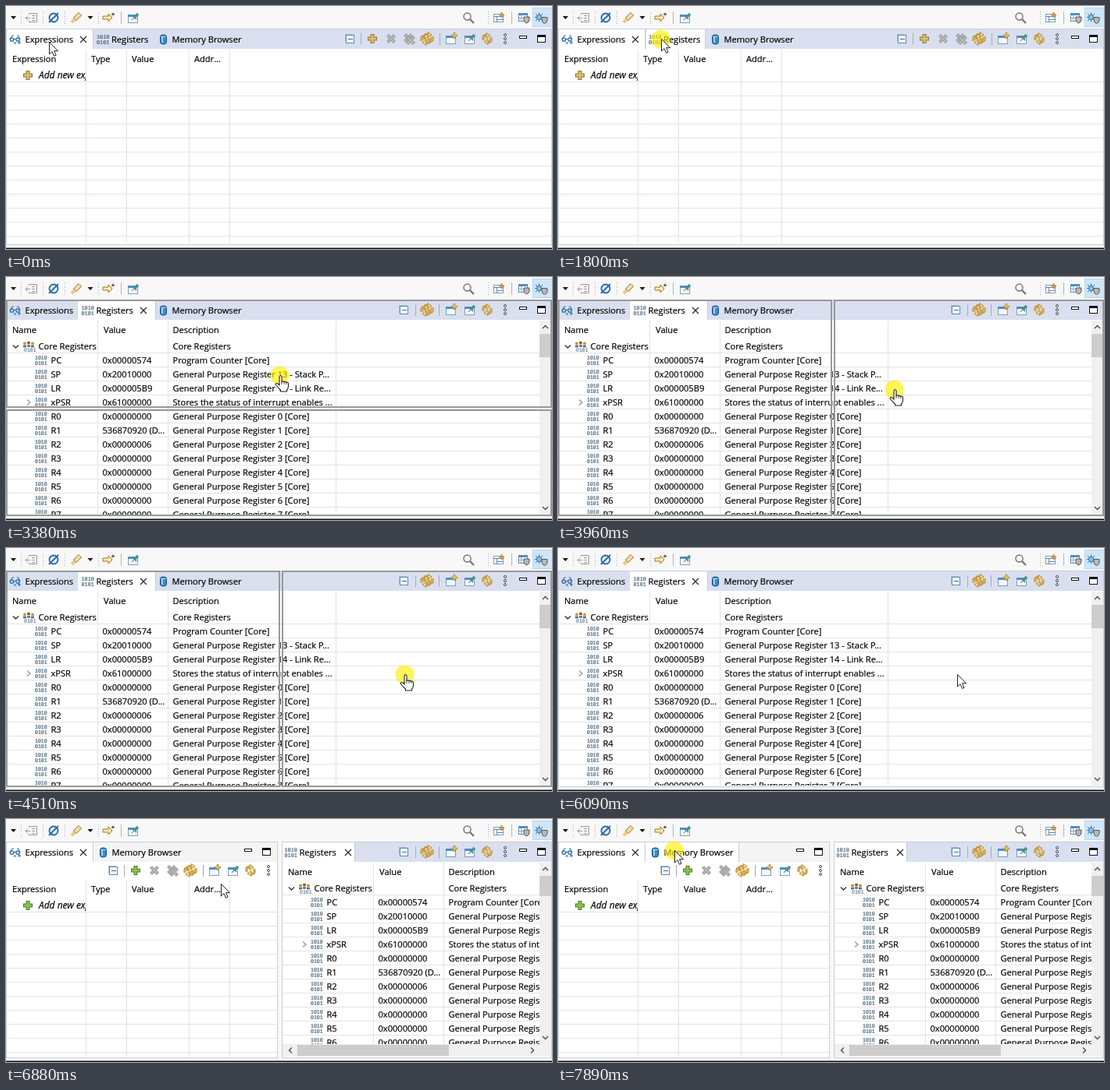
Animation of 699 by 312 pixels, one loop 8000 ms. Source, as an HTML page:

```html
<!DOCTYPE html>
<html lang="en">
<head>
<meta charset="utf-8">
<title>Docking views</title>
<style>
  html, body { margin: 0; width: 699px; height: 312px; overflow: hidden; background: #f8f8f8; }
  #stage { display: block; font: 11.1px "Open Sans", "Noto Sans", sans-serif; }
  text { white-space: pre; }
  .label { fill: #000; stroke: #000; stroke-width: .2px; }
</style>
</head>
<body>
<svg id="stage" width="699" height="312" viewBox="0 0 699 312"></svg>
<script>
const LOOP = 8000, TICK = 112.7;
const BAR = '#d9dfee', GRID = '#e3e3e3', EDGE = '#c8cddb', GOLD = '#c9962a', BLUE = '#2468a6';

// Drawing helpers
const rect = (x, y, w, h, fill, more = '') => `<rect x="${x}" y="${y}" width="${w}" height="${h}" fill="${fill}" ${more}/>`;
const box = (x, y, w, h, stroke, fill = 'none') => rect(x + .5, y + .5, w - 1, h - 1, fill, `stroke="${stroke}"`);
const path = (d, stroke, w = 1, fill = 'none', more = '') => `<path d="${d}" stroke="${stroke}" stroke-width="${w}" fill="${fill}" ${more}/>`;
const text = (x, y, s, more = '') => `<text class="label" x="${x}" y="${y}" ${more}>${s}</text>`;
const at = (x, y, body) => `<g transform="translate(${x} ${y})">${body}</g>`;
const group = (id, body) => `<g id="${id}">${body}</g>`;
const clip = (x, w, h, body) => `<svg x="${x}" y="0" width="${w}" height="${h}">${body}</svg>`;
const range = n => [...Array(n).keys()];

const digits = (size, top, bottom) => `<g font-family="Liberation Mono, monospace" font-size="${size}" fill="#35566d" stroke="#35566d" stroke-width=".15">` +
  `<text x="-8" y="${top}">1010</text><text x="-8" y="${bottom}">0101</text></g>`;
const loopArrows = path('M-5 2V-2Q-4-5 0-4M5-2V2Q4 5 0 4', '#b07d1e', 3) + path('M-5 2V-2Q-4-5 0-4M5-2V2Q4 5 0 4', '#f3cb62', 1.2) +
  path('M-1-7.500L4-4L-1-.5ZM1 .5L-4 4L1 7.500Z', '#a9761c', .8, '#f7d67c');

// Icons, each centred on the origin
const icon = {
  glasses: path('M-7 0L-4-5H-2M2-5H4L6 0', BLUE) +
    `<g fill="none" stroke="${BLUE}" stroke-width="1.300"><circle cx="-4.500" cy="0" r="2.200"/><circle cx="3" cy="0" r="2.200"/></g>` +
    path('M-2.500-.5H.5M-2 3l3 3M1 3l-3 3M3 4H7M5 2V6', BLUE),
  bits: digits(6.5, -1, 5.5),
  tabBits: digits(6.8, -1, 6),
  memory: rect(-3.5, -6, 8, 12, '#3c8ccb', 'rx="3" stroke="#1b4f83"') +
    rect(-2, -3, 2, 7, '#9ccdf0') + path('M-2.500-3.500H3.500', '#b5daf5'),
  close: path('M-4-4L4 4M4-4L-4 4', '#222', 1.1),
  people: `<circle cx="-5" cy="-3.500" r="2" fill="${GOLD}"/><circle cx="0" cy="-4.500" r="2" fill="#8a5a2b"/>` +
    `<circle cx="5" cy="-3.500" r="2" fill="${GOLD}"/>` + path('M-7 0h4M-2-.5h4M3 0h4', '#4c6f96', 2.5) +
    `<text x="-6" y="7" font-family="Liberation Mono, monospace" font-size="6.500" fill="#35566d">0101</text>`,
  collapse: box(-6, -6, 10, 10, '#a9bfd4') + box(-5, -5, 11, 11, '#5d88b3', '#fff') + path('M-2 .5H4', BLUE),
  plus: ([edge, fill]) => path('M0-6V6M-6 0H6', edge, 5) + path('M0-5V5M-5 0H5', fill, 3),
  cross: path('M-4.500-4.500L4.500 4.500M4.500-4.500L-4.500 4.500', '#989898', 4) + path('M-4-4L4 4M4-4L-4 4', '#b8b8b8', 2),
  refresh: loopArrows,
  refreshAll: at(2, -1, loopArrows) + at(-2, 1, loopArrows),
  window: box(-7, -4, 13, 11, '#7d9fbe', '#f4f9fd') + rect(-7, -4, 13, 3, '#4f8fc4') +
    path('M4-8V0M0-4H8', '#b58a2c', 2.6) + path('M4-7V-1M1-4H7', '#f5d27a', 1),
  pin: box(-7, -4, 13, 11, '#7d9fbe', '#f4f9fd') + rect(-7, -4, 9, 3, '#4f8fc4') +
    path('M-2 3L1 0', '#555') + path('M0-2L4 2', '#3d7f77', 1.6) + path('M2-1L6-5', '#4a938a', 3.5),
  kebab: range(3).map(i => `<circle cx="0" cy="${i * 5 - 5}" r="1.500" fill="#fff" stroke="#444"/>`).join(''),
  minimize: box(-5, -5, 10, 4, '#111', '#fff'),
  maximize: box(-5, -5, 11, 10, '#111', '#fff') + rect(-5, -5, 11, 3, '#111'),
  drop: path('M-3.500-2H3.500L0 2Z', 'none', 0, '#111'),
  arrow: path('M-7-2H0V-5L5 0L0 5V2H-7Z', '#a9761c', 1, '#fbe9b4') + path('M4-4.500H8M6-6.500V-2.500', '#333')
};
const put = (name, x, y) => at(x, y, icon[name]);
const plus = (x, y, green) => at(x, y, icon.plus(green ? ['#4c7d2c', '#8cc152'] : ['#94762f', '#d8bd72']));

function mainToolbar() {
  const dots = x => path(`M${x}.5 7V23`, '#aaa', 1, 'none', 'stroke-dasharray="1 2"');
  const sep = x => path(`M${x}.5 7V23`, '#b5b5b5');
  const shield = (x, y) => at(x, y, path('M-3.500-3.500H3.500V.5Q3 3.500 0 4.500Q-3 3.500-3.500 .5Z', '#555', 1, '#b9b9b9'));
  return rect(0, 0, 699, 312, '#f8f8f8') +
    put('drop', 9.5, 15) + put('drop', 108, 15) + [19, 47, 75, 118, 617].map(dots).join('') + sep(147) + sep(647) +
    path('M29.500 11V9.500H39.500V20.500H29.500V19M25 15.500H31M28 12.500L25 15.500L28 18.500M33 12.500H37M33 15.500H37M33 18.500H37', '#999') +
    `<circle cx="61" cy="15" r="5.500" fill="#e7f1fa" stroke="${BLUE}" stroke-width="1.800"/>` + path('M55 21L67 9', BLUE, 1.8) +
    path('M84 21L91 14', '#ecc983', 4) + path('M88 17L95 10', '#a97c35', 6) + path('M88.500 16.500L94.500 10.500', '#f3dcae', 4) +
    put('arrow', 131, 15) + put('pin', 163, 15) +
    `<circle cx="590.500" cy="13.500" r="4.500" fill="none" stroke="#777" stroke-width="1.500"/>` + path('M594 17L599 22', '#777', 2.4) +
    box(624, 10, 13, 11, '#7d9fbe', '#fff') + path('M624 13.500H637M628.500 13V21M628 17.500H637', '#5d88b3') + path('M634.500 8V15M631 11.500H638', GOLD, 2) +
    box(656, 9, 12, 11, '#5d88b3', '#fff') + rect(656, 9, 12, 3, '#4f8fc4') + path('M659.500 12V20M657 15.500H667', '#8caac6') +
    shield(666.5, 17.5) +
    box(674, 2, 26, 25, '#b5d8f1', '#cfe6f8') +
    path('M678 10L687 19M687 10L678 19M682.500 8.500V20M677 14.500H688', BLUE) +
    `<circle cx="682.500" cy="14.500" r="3" fill="#8cc4e8" stroke="${BLUE}"/>` + shield(689.5, 18) +
    rect(0, 310.5, 699, 1.5, '#111');
}

// Pane frame with its tab strip
const pane = (x, w, bar = BAR) => box(x, 29, w, 278, EDGE, '#fff') + rect(x + 1, 30, w - 2, 25, bar);
const tabBack = (x, w) => rect(x, 30, w, 26, '#fff') + path(`M${x + w - .5} 30V55`, EDGE);
const tab = (name, x, label, gap) => put(name, x, 43) + text(x + gap, 47, label);
const exprTab = tab('glasses', 12, 'Expressions', 12.5);
const regTab = x => tab('tabBits', x, 'Registers', 11);
const memTab = x => tab('memory', x, 'Memory Browser', 11.5);
const sizeButtons = x => put('minimize', x - 23, 43) + put('maximize', x, 42);

function viewTools(dx, dy, expr, green) {
  const first = expr ? 440 : 509;
  const seps = expr ? [454, 555] : [524, 554];
  return at(dx, dy, put('collapse', first, 42) +
    seps.map(x => path(`M${x}.5 35V50`, '#a7acb8')).join('') +
    (expr ? plus(469, 42, green) + put('cross', 493, 42) + put('cross', 515, 41) + put('cross', 518, 44) : '') +
    put('refreshAll', 539, 42) + put('window', 570, 42) + put('pin', 594, 42) + put('refresh', 616, 42) + put('kebab', 639, 42));
}

const gridLines = (right, bottom, dy, columns) => path(
  range(12).map(i => 97.5 + dy + 18 * i).filter(y => y < bottom).map(y => `M1 ${y}H${right}`).join('') +
  columns.map(x => `M${x}.5 ${56 + dy}V${bottom}`).join(''), GRID);

function exprTable(right, dy, addId) {
  const heads = [[8, 'Expression'], [109, 'Type'], [161, 'Value'], [241, 'Addr...']];
  return gridLines(right, 305, dy, [102, 154, 234, 286]) +
    heads.map(([x, s]) => text(x, 72 + dy, s)).join('') +
    group(addId, plus(28, 89 + dy, dy > 0) + clip(0, 102, 305, text(42, 93 + dy, 'Add new expression', 'font-style="italic" font-size="12"')));
}

const purpose = 'General Purpose Register ';
const registers = [
  ['PC', '0x00000574', 'Program Counter [Core]'],
  ['SP', '0x20010000', purpose + '13 - Stack P...'],
  ['LR', '0x000005B9', purpose + '14 - Link Re...'],
  ['xPSR', '0x61000000', 'Stores the status of interrupt enables ...'],
  ...range(8).map(i => ['R' + i, i === 1 ? '536870920 (D...' : i === 2 ? '0x00000006' : '0x00000000', `${purpose}${i} [Core]`])
];

function regTable(dx, bottom, hover = '') {
  const rows = registers.map(([name, value, note], i) => {
    const y = 111 + 18 * i;
    return put('bits', 45, y - 4) + text(57.5, y, name) + text(123.5, y, value) + text(213.5, y, note);
  }).join('');
  return clip(dx, 683 - dx, bottom,
    hover + gridLines(683, bottom, 0, [117, 207, 422]) +
    text(8, 72, 'Name') + text(125, 72, 'Value') + text(213.5, 72, 'Description') +
    path('M9 87.500L12.500 91L16 87.500', '#333', 1.4) + put('people', 29, 89) + text(41.5, 93, 'Core Registers') + text(213.5, 93, 'Core Registers') +
    path('M27 157.500L31 161L27 164.500', '#999', 1.4) + rows);
}

const vScroll = (bottom, thumb) => rect(683, 56, 15, bottom - 56, '#f0f0f0') + rect(683, 73, 15, thumb, '#cdcdcd') +
  path(`M687 66L690.500 62.500L694 66M687 ${bottom - 10}L690.500 ${bottom - 6.5}L694 ${bottom - 10}`, '#555', 1.5);
const hScroll = rect(354, 289, 344, 16, '#f0f0f0') + rect(373, 290, 194, 14, '#cdcdcd') +
  path('M366 293.500L362.500 297L366 300.500M672 293.500L675.500 297L672 300.500', '#555', 1.5);
const outline = rects => rects.map(([x, y, w, h]) => rect(x, y, w, h, 'none', 'stroke="#999" stroke-width="2"')).join('');
const columns = x => outline([[1, 30, x - 1, 276], [x + 4, 30, 694 - x, 276]]);

document.getElementById('stage').innerHTML = mainToolbar() +
  group('exprScene', pane(0, 699) + tabBack(1, 111) + group('regHover', tabBack(113, 76)) +
    exprTab + put('close', 99, 43) + regTab(124) + memTab(201) + viewTools(0, 0, true) + sizeButtons(685) + exprTable(698, 0, 'addFull')) +
  group('regScene', pane(0, 699) + tabBack(92, 100) + exprTab + regTab(104.5) + put('close', 176, 43) + memTab(201) +
    viewTools(0, 0, false) + sizeButtons(685) + regTable(0, 305) + vScroll(305, 30)) +
  group('splitScene', pane(0, 348, '#f4f4f4') + tabBack(1, 111) + group('memHover', tabBack(112, 120)) +
    exprTab + put('close', 99, 43) + memTab(124) + viewTools(-303, 24, true, true) + sizeButtons(333) + exprTable(347, 22, 'addSplit') +
    pane(353, 346) + tabBack(354, 93) + regTab(364.5) + put('close', 438, 43) + viewTools(0, 0, false) + sizeButtons(685) +
    regTable(353, 289, rect(1, 0, 699, 17, '#e5f3fc', 'id="rowHover"')) + vScroll(289, 26) + hScroll) +
  group('dropLeft', columns(351)) +
  group('dropRight', columns(350)) +
  group('dropTop', outline([[1, 30, 697, 137], [1, 171, 697, 135]])) +
  group('pointer', `<circle id="press" cx="-.5" cy=".5" r="12" fill="#fff000" opacity=".65"/>` +
    group('arrow', path('M.5.5V16L4 12.700L6.500 18.300L9 17.200L6.600 11.700H11.500Z', '#222', 1, '#fff')) +
    group('hand', path('M-1 2Q.5-1 2 2V8.500Q3.500 7 5 8.700Q6.500 7.700 7.800 9.300Q10 8.500 10.500 11V14.500Q10.500 17 8.500 19V21H.5V19Q-2 17-6 12Q-5.500 9.500-3 11L-1 13Z', '#222', 1.1, '#fff') +
      path('M2 8V12M5 9V12M7.800 9.500V12', '#222', .8)));

const el = id => document.getElementById(id);
const show = (id, on) => el(id).setAttribute('display', on ? 'inline' : 'none');

// Pointer stops: [tick, x, y]; the pointer moves evenly between them
const stops = [[0, 55, 46], [1, 53, 38], [3, 53, 38], [4, 52, 38], [8, 52, 38], [14, 132, 42], [18, 132, 42],
  [22, 235, 59], [30, 351, 126], [40, 511, 162], [54, 511, 162], [55, 507, 158], [56, 507, 158], [61, 275, 83],
  [63, 149, 34], [65, 149, 34], [67, 149, 37], [68, 149, 37], [69, 149, 40], [72, 149, 40]];

function pointerAt(tick) {
  const i = Math.max(1, stops.findIndex(s => s[0] >= tick));
  const [a, x0, y0] = stops[i - 1], [b, x1, y1] = stops[i];
  const k = (tick - a) / (b - a);
  return [Math.round(x0 + (x1 - x0) * k), Math.round(y0 + (y1 - y0) * k)];
}

function draw(ms) {
  const tick = Math.floor(ms / TICK + .11);
  const between = (a, b) => tick >= a && tick < b;
  const [x, y] = pointerAt(tick);
  const dragging = between(19, 54), split = tick >= 55;

  show('exprScene', tick < 19);
  show('regScene', between(19, 55));
  show('splitScene', split);
  show('regHover', tick < 19 && x >= 113);
  show('memHover', split && x < 232 && y < 55);
  show('addSplit', tick >= 57);

  const row = Math.floor((y - 80) / 18);
  show('rowHover', split && x > 354 && row >= 0);
  el('rowHover').setAttribute('y', 80 + 18 * row);

  show('dropLeft', between(20, 26));
  show('dropTop', between(26, 34));
  show('dropRight', between(34, 54));
  show('press', between(16, 54) || tick >= 69);
  show('hand', dragging);
  show('arrow', !dragging);
  el('pointer').setAttribute('transform', `translate(${x} ${y})`);
}

const start = performance.now();
function frame() {
  draw((performance.now() - start) % LOOP);
  requestAnimationFrame(frame);
}
draw(0);
requestAnimationFrame(frame);
</script>
</body>
</html>
```
